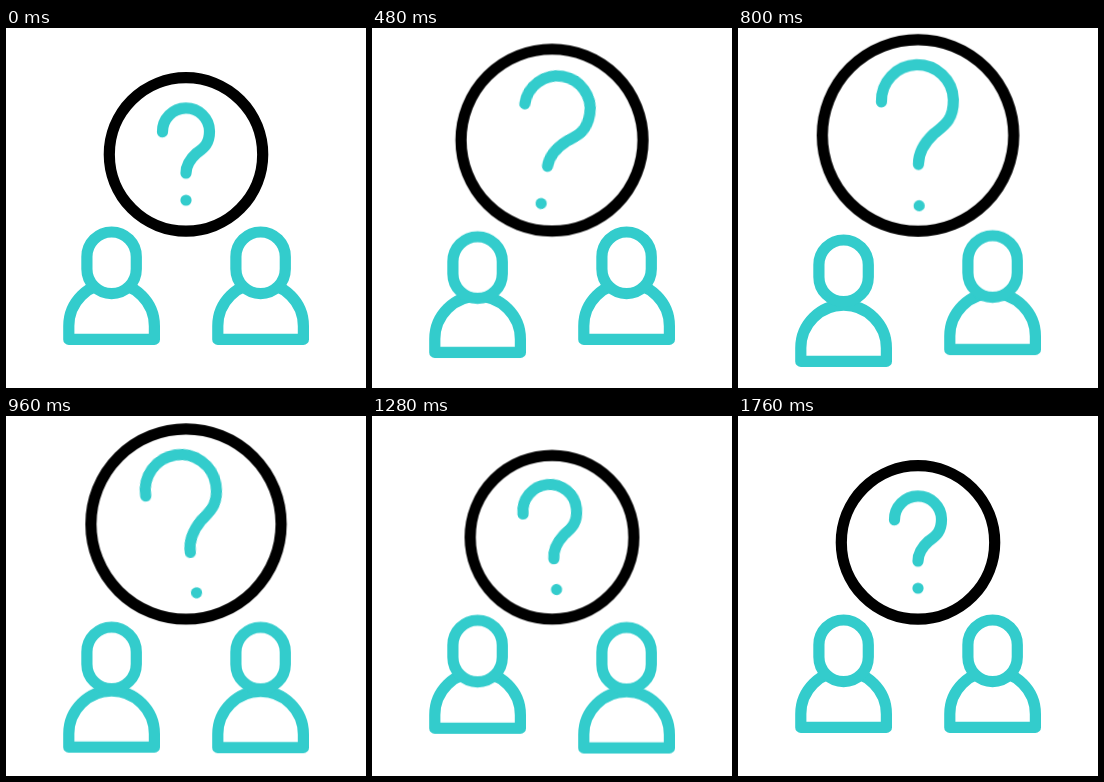
An HTML page that plays this animation: 360 px wide and 360 px high, repeating every 1840 ms.

```html
<!DOCTYPE html>
<html lang="en">
<head>
<meta charset="utf-8">
<title>Two people, one question</title>
<style>
  html, body { margin: 0; width: 100%; height: 100%; overflow: hidden; background: #fff; }
  svg { display: block; width: 360px; height: 360px; }

  svg * {
    --loop: 1840ms;
    --strong: cubic-bezier(.65, 0, .35, 1);
    --soft: cubic-bezier(.333, 0, .667, 1);
  }
  path, circle, rect {
    fill: none;
    stroke: #33cccc;
    stroke-width: 11.2;
    stroke-linecap: round;
    stroke-linejoin: round;
    vector-effect: non-scaling-stroke;
  }

  /* The ring grows upwards from its lowest point. */
  .ring {
    stroke: #000;
    transform-origin: 180px 203.1px;
    animation: ring var(--loop) var(--strong) infinite;
  }
  @keyframes ring {
    0%, 3.26%, 86.96%, 100% { transform: none; }
    41.3%, 44.57% { transform: scale(1.248); }
  }

  .mark { animation: mark var(--loop) var(--strong) infinite; }
  @keyframes mark {
    0%, 3.26%, 86.96%, 100% { transform: translate(180px, 126.2px) scale(1); }
    41.3%, 44.57% { transform: translate(180px, 107.4px) scale(1.53); }
  }
  .tilt { animation: tilt var(--loop) var(--soft) infinite; }
  @keyframes tilt {
    0%, 2.72%, 82.61%, 100% { transform: rotate(0deg); }
    28.8% { transform: rotate(10deg); }
    56.52% { transform: rotate(-10deg); }
  }

  /* Head and body sink together, the body further. */
  .head, .body { animation: sink var(--loop) var(--strong) var(--delay, 0s) infinite; }
  .head { --depth: 8px; fill: #fff; }
  .body { --depth: 22px; }
  .second { --delay: -1490ms; }
  @keyframes sink {
    0%, 7.61%, 76.09%, 100% { transform: translateY(0); }
    42.39% { transform: translateY(var(--depth)); }
  }
</style>
</head>
<body>
<svg viewBox="0 0 360 360">
  <circle class="ring" cx="180" cy="126.4" r="76.7"/>
  <g class="mark">
    <g class="tilt">
      <path d="M-23.5-22.3A23.5 23.5 0 0 1 23.5-23C23.5-9.5 17-6 10.5-1C5 4 0 10 0 19"/>
      <path d="M0 46h.01"/>
    </g>
  </g>
  <g>
    <path class="body" d="M62.8 311.4V298a42.8 42.8 0 0 1 85.6 0V311.4Z"/>
    <rect class="head" x="80.9" y="204" width="49.4" height="61.6" rx="24.7"/>
  </g>
  <g class="second" transform="translate(149)">
    <path class="body second" d="M62.8 311.4V298a42.8 42.8 0 0 1 85.6 0V311.4Z"/>
    <rect class="head second" x="80.9" y="204" width="49.4" height="61.6" rx="24.7"/>
  </g>
</svg>
</body>
</html>
```
